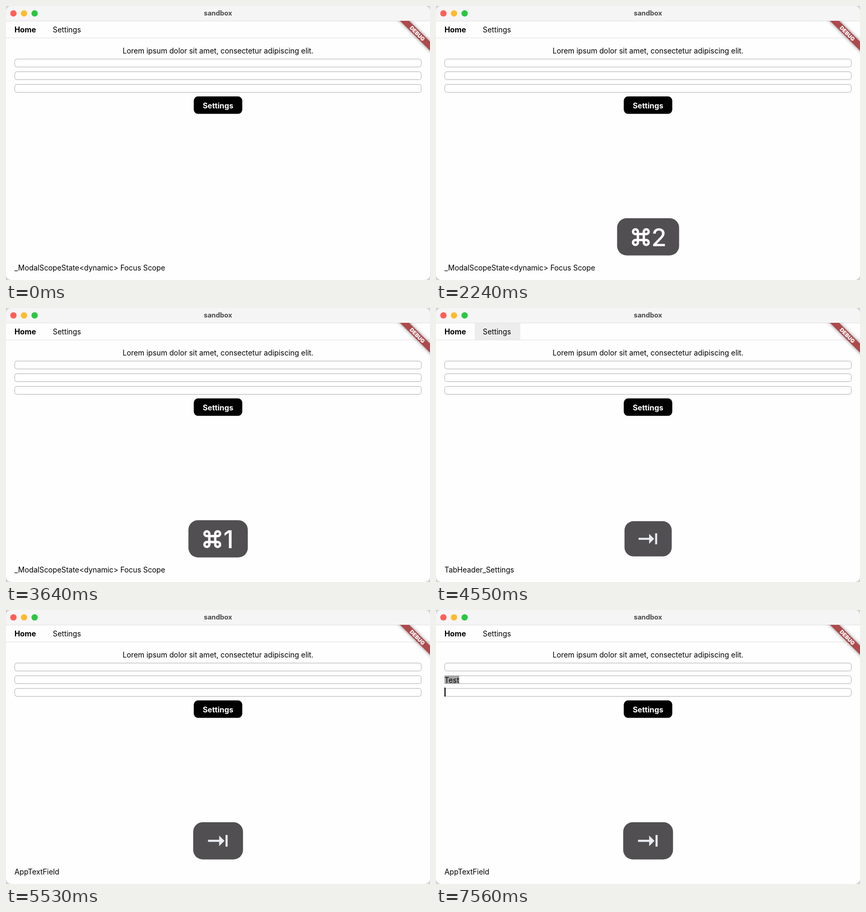
These frames come from a looping animation (800x519 px, 8000 ms). An HTML page with a canvas:

```html
<!DOCTYPE html>
<html lang="en">
<head>
<meta charset="utf-8">
<title>sandbox</title>
<style>
html, body { margin: 0; width: 100%; height: 100%; overflow: hidden; background: #fff; }
canvas { display: block; width: 800px; height: 519px; }
</style>
</head>
<body>
<canvas id="stage" width="800" height="519"></canvas>
<script>
const ctx = document.getElementById('stage').getContext('2d');
const LOOP = 8000;
const FONT = 'Inter, Roboto, sans-serif';
const BODY = `400 13.8px ${FONT}`;
const BOLD = `700 14.2px ${FONT}`;
const SCOPE = '_ModalScopeState<dynamic> Focus Scope';

// Each step changes part of the state from its time on.
const steps = [
  { at: 0, page: 'home', status: SCOPE, keys: '', focus: '', typed: '', selected: false },
  { at: 2240, keys: '⌘2' },
  { at: 2310, page: 'settings' },
  { at: 3640, page: 'home', keys: '⌘1' },
  { at: 4410, keys: '⇥', focus: 'Home', status: 'TabHeader_Home' },
  { at: 4550, focus: 'Settings', status: 'TabHeader_Settings', pulse: 4550 },
  { at: 4760, focus: 0, status: 'AppTextField', pulse: 4760 },
  { at: 5040, focus: 1, pulse: 5040, caretFrom: 5040 },
  { at: 6020, typed: 'T' },
  { at: 6160, typed: 'Te' },
  { at: 6300, typed: 'Tes' },
  { at: 6440, typed: 'Test', keys: '' },
  { at: 6790, focus: 2, keys: '⇥' },
  { at: 7210, focus: 1, keys: '⇧⇥', selected: true },
  { at: 7490, focus: 2, keys: '⇥' }
];
const shortcuts = [['Open Settings', ','], ['Show Command Palette', 'P'], ['Open New Tab', 'T'], ['Go Back', '[']];

const stateAt = t => Object.assign({}, ...steps.filter(s => s.at <= t));

function text(str, x, y, font = BODY, color = '#000', align = 'left') {
  ctx.font = font;
  ctx.fillStyle = color;
  ctx.textAlign = align;
  ctx.fillText(str, x, y);
}

function box(x, y, w, h, r, fill, stroke) {
  ctx.beginPath();
  ctx.roundRect(x, y, w, h, r);
  if (fill) { ctx.fillStyle = fill; ctx.fill(); }
  if (stroke) { ctx.strokeStyle = stroke; ctx.lineWidth = 1; ctx.stroke(); }
}

function rect(x, y, w, h, fill) {
  ctx.fillStyle = fill;
  ctx.fillRect(x, y, w, h);
}

function button(label, x, y, w) {
  box(x, y, w, 33, 8, '#000');
  text(label, x + w / 2, y + 22.2, BOLD, '#fff', 'center');
}

function commandSign(cx, cy, size, width, color) {
  const half = (size - width) / 2, a = half * 0.38, r = (half - a) / 2, c = a + r;
  ctx.save();
  ctx.translate(cx, cy);
  ctx.strokeStyle = color;
  ctx.lineWidth = width;
  ctx.beginPath();
  for (let i = 0; i < 4; i++) {
    ctx.moveTo(-c, a);
    ctx.lineTo(c, a);
    ctx.arc(c, c, r, -Math.PI / 2, Math.PI);
    ctx.rotate(Math.PI / 2);
  }
  ctx.stroke();
  ctx.restore();
}

function tabSign(x) {
  rect(x - 19, -2, 24, 4, '#e9ebf0');
  rect(x + 14, -11, 4, 22, '#e9ebf0');
  ctx.beginPath();
  ctx.moveTo(x + 2, -10);
  ctx.lineTo(x + 12, 0);
  ctx.lineTo(x + 2, 10);
  ctx.fill();
}

function shiftSign(x) {
  ctx.beginPath();
  [[0, -14], [14, 1], [7, 1], [7, 13], [-7, 13], [-7, 1], [-14, 1]].forEach(([px, py]) => ctx.lineTo(x + px, py));
  ctx.closePath();
  ctx.strokeStyle = '#e9ebf0';
  ctx.lineWidth = 3.5;
  ctx.lineJoin = 'round';
  ctx.stroke();
}

function keyOverlay(s, t) {
  if (!s.keys) return;
  const width = { '⌘2': 117, '⌘1': 112, '⇥': 94, '⇧⇥': 132 }[s.keys];
  const since = t - (s.pulse ?? -LOOP);
  const scale = 1 - 0.053 * Math.max(0, 1 - since / 140);
  ctx.save();
  ctx.translate(400.2, 437.2);
  ctx.scale(scale, scale);
  if (t > 6200 && t < 6440) ctx.globalAlpha = (6440 - t) / 240;
  box(-width / 2, -35.2, width, 70.4, 18, '#514f51');
  if (s.keys[0] === '⌘') {
    const two = s.keys[1] === '2';
    commandSign(two ? -13.7 : -11, 0.5, 34, 4.5, '#fff');
    text(s.keys[1], two ? 20.5 : 19.5, 17.6, `500 46px ${FONT}`, '#fff', 'center');
  } else if (s.keys[0] === '⇧') {
    shiftSign(-25);
    tabSign(25);
  } else {
    tabSign(0);
  }
  ctx.restore();
}

function titleBar() {
  rect(0, 0, 800, 28, '#f6f5f6');
  rect(0, 28, 800, 1, '#e3e2e3');
  ['#fe5f57', '#febc2e', '#28c840'].forEach((color, i) => box(8 + 20 * i, 8, 12, 12, 6, color));
  text('sandbox', 400, 18.3, `700 12.7px ${FONT}`, '#4b494b', 'center');
}

function tabs(s) {
  const home = s.page === 'home';
  if (s.focus === 'Home') rect(0, 29, 73, 31, '#ededed');
  if (s.focus === 'Settings') rect(73, 29, 86, 31, '#ededed');
  rect(0, 60, 800, 1, '#e2e2e2');
  text('Home', 16, 50, home ? BOLD : BODY);
  text('Settings', home ? 88.3 : 86.3, 50, home ? BODY : BOLD);
}

function homePage(s, t) {
  text('Lorem ipsum dolor sit amet, consectetur adipiscing elit.', 400, 90.4, BODY, '#000', 'center');
  for (let i = 0; i < 3; i++) {
    const y = 100 + 24 * i;
    box(16.5, y + 0.5, 767, 15, 4, '#fff', '#b4b4b4');
    const value = i === 1 ? s.typed : '';
    if (i === 1 && s.selected) rect(16, y, 28, 16, '#a6a6a6');
    text(value, 16, y + 13.5);
    const blinkOff = t >= 5530 && t < 6020;
    if (s.focus === i && !blinkOff && !(i === 1 && s.selected)) {
      rect(16 + ctx.measureText(value).width, y - 1, 2, 17, '#000');
    }
  }
  button('Settings', 354.3, 171.3, 91.5);
}

function settingsPage() {
  ctx.save();
  ctx.beginPath();
  ctx.rect(0, 61, 800, 442);
  ctx.clip();
  text('Keyboard Shortcuts', 360.5, 99.4, `700 24px ${FONT}`, '#000', 'center');
  button('Add New Shortcut', 624.5, 135.7, 159.5);
  shortcuts.forEach(([name, key], i) => {
    const y = 192 + 91 * i;
    box(16.5, y + 0.5, 767, 79, 8, '#fff', '#f2f2f2');
    text(name, 32.6, y + 31.6, `700 16px ${FONT}`);
    box(32.5, y + 39.3, key === ',' ? 50.5 : 55, 24.7, 4, '#f5f5f5');
    commandSign(46.8, y + 52.3, 11, 1.4, '#000');
    text('+ ' + key, 56.3, y + 57, `500 13.8px ${FONT}`);
    button('Edit', 621.8, y + 23.5, 60);
    button('Delete', 689.7, y + 23.5, 78.2);
  });
  ctx.restore();
}

function debugBanner() {
  ctx.save();
  ctx.beginPath();
  ctx.rect(0, 28, 800, 491);
  ctx.clip();
  ctx.translate(800, 28);
  ctx.rotate(Math.PI / 4);
  ctx.shadowColor = 'rgba(0,0,0,.5)';
  ctx.shadowBlur = 6;
  rect(-60, 28, 120, 12, '#ad4a4c');
  ctx.shadowColor = 'transparent';
  text('DEBUG', 0, 37.6, `900 10.2px ${FONT}`, '#fff', 'center');
  ctx.restore();
}

function draw() {
  const t = performance.now() % LOOP;
  const s = stateAt(t);
  rect(0, 0, 800, 519, '#d2d2d2');
  ctx.save();
  ctx.beginPath();
  ctx.roundRect(0, 0, 800, 519, 10);
  ctx.clip();
  rect(0, 0, 800, 519, '#fefefe');
  titleBar();
  tabs(s);
  if (s.page === 'home') homePage(s, t);
  else settingsPage();
  text(s.status, 16, 501);
  debugBanner();
  keyOverlay(s, t);
  ctx.restore();
  requestAnimationFrame(draw);
}

ctx.textBaseline = 'alphabetic';
draw();
</script>
</body>
</html>
```
